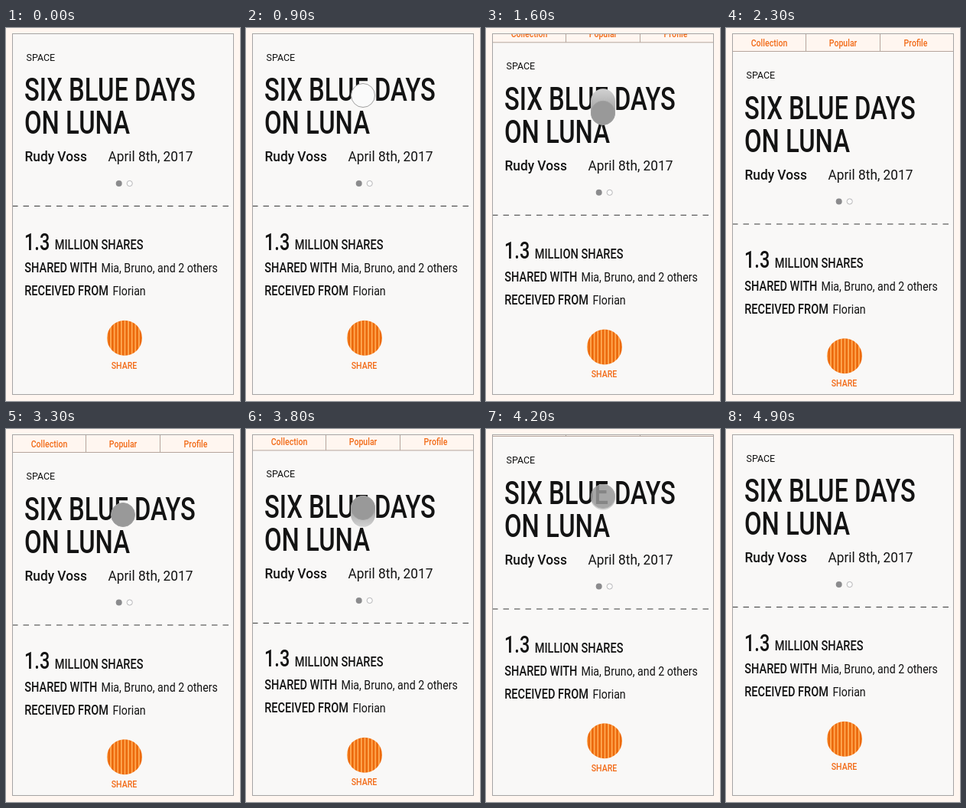
An HTML page that plays this animation: 306x487 px, repeating every 5000 ms.

```html
<!DOCTYPE html>
<html lang="en">
<head>
<meta charset="utf-8">
<title>Article card</title>
<style>
  html, body { margin: 0; height: 100%; overflow: hidden; background: #fff6f0; }
  svg { display: block; width: 306px; height: 487px; }
  text { font-family: Roboto, Inter, sans-serif; }
</style>
</head>
<body>
<svg viewBox="0 0 306 487">
  <defs>
    <clipPath id="inside"><rect x="8" y="7" width="290" height="471.5"/></clipPath>
    <pattern id="stripes" width="4.6" height="8" patternUnits="userSpaceOnUse">
      <rect width="4.6" height="8" fill="#ffa850"/>
      <rect width="2.7" height="8" fill="#ec690c"/>
    </pattern>
    <linearGradient id="fade" gradientUnits="userSpaceOnUse" x1="0" x2="0">
      <stop stop-color="#a0a0a0"/>
      <stop offset="1" stop-color="#d2d2d2"/>
    </linearGradient>
  </defs>
  <rect x="8" y="7" width="290" height="471.5" fill="#f9f8f7"/>
  <g clip-path="url(#inside)">
    <g id="sheet">
      <path d="M8 232.5H298" stroke="#222" stroke-width=".9" stroke-dasharray="7.5 7"/>
      <circle cx="147.7" cy="203" r="4" fill="#8b8b8d"/>
      <circle cx="161.7" cy="203" r="3.6" fill="#fdfdfd" stroke="#a5a5a7" stroke-width=".8"/>
      <circle cx="155" cy="404.7" r="23" fill="url(#stripes)"/>
      <path d="M8.5 -16.5H297.5V7H8.5ZM104.5 -16.5V7M201.5 -16.5V7" fill="#fff6f0" stroke="#b5a59c"/>
    </g>
  </g>
  <rect x="8.5" y="7.5" width="289" height="471" fill="none" stroke="#a5a4a4"/>
  <g id="touch">
    <path id="trail" stroke="url(#fade)" stroke-width="32" stroke-linecap="round"/>
    <circle id="finger" cx="153" r="15.5" stroke="#a0a0a0"/>
  </g>
</svg>
<script>
const LOOP = 5000, PULL = 23.5, TOP = 88, BOTTOM = 112, LAG = 220;
const INK = '#131313', ORANGE = '#f26a16';
const CONDENSED = .77, BOOK = .91;
const [sheet, touch, trail, finger, fade] =
  ['sheet', 'touch', 'trail', 'finger', 'fade'].map(id => document.getElementById(id));

function set(node, attrs) {
  for (const name in attrs) node.setAttribute(name, attrs[name]);
}

function label(words, x, y, size, weight, face, color = INK, anchor = 'start') {
  const node = document.createElementNS('http://www.w3.org/2000/svg', 'text');
  set(node, {
    transform: `translate(${x} ${y}) scale(${face} 1)`,
    'font-size': size, 'font-weight': weight, fill: color, 'text-anchor': anchor
  });
  node.textContent = words;
  sheet.append(node);
}

const small = (words, x, y) =>
  label(words, x, y, 13.7, 500, CONDENSED, ORANGE, 'middle');

label('SPACE', 26.5, 42.5, 13.7, 400, BOOK);
label('SIX BLUE DAYS', 24, 95, 42.5, 500, CONDENSED);
label('ON LUNA', 24, 138, 42.5, 500, CONDENSED);
label('Rudy Voss', 24.5, 174, 19, 500, BOOK);
label('April 8th, 2017', 133.5, 174, 19, 400, BOOK);
label('1.3', 24, 289.5, 30.5, 500, CONDENSED);
label('MILLION SHARES', 63.7, 289.2, 18.9, 500, CONDENSED);
label('SHARED WITH', 24.2, 319.2, 18.9, 500, CONDENSED);
label('Mia, Bruno, and 2 others', 124.5, 319.2, 15.6, 400, BOOK);
label('RECEIVED FROM', 24.2, 349.2, 18.9, 500, CONDENSED);
label('Florian', 139.5, 349.2, 15.6, 400, BOOK);
small('SHARE', 154.5, 444.5);
small('Collection', 56.5, 0);
small('Popular', 153, 0);
small('Profile', 248, 0);

const ramp = (t, from, to) => Math.min(1, Math.max(0, (t - from) / (to - from)));
const ease = p => p < .5 ? 4 * p ** 3 : 1 - 4 * (1 - p) ** 3;
const glide = (t, from, to) => ease(ramp(t, from, to));

// Finger height: dragged down, later dragged back up.
const fingerY = t =>
  TOP + (BOTTOM - TOP) * (glide(t, 1110, 1750) - glide(t, 3510, 4150));

function draw(t) {
  const pull = PULL * (glide(t, 1100, 2100) - glide(t, 3500, 4500));
  set(sheet, { transform: `translate(0 ${pull})` });

  const shown = ramp(t, 780, 880) - ramp(t, 1800, 2150)
              + ramp(t, 2620, 2720) - ramp(t, 4150, 4500);
  const pressed = t < 2400 ? ramp(t, 900, 1150) : ramp(t, 2700, 2920);
  const shade = Math.round(250 - 97 * pressed);
  const head = fingerY(t), tail = fingerY(t - LAG);

  set(touch, { opacity: shown });
  set(finger, { cy: head, fill: `rgb(${shade},${shade},${shade})` });
  set(fade, { y1: head, y2: tail + 16 * Math.sign(tail - head) });
  set(trail, {
    d: `M153 ${tail}V${head}`,
    visibility: Math.abs(head - tail) > .2 ? 'visible' : 'hidden'
  });
}

function tick() {
  draw(performance.now() % LOOP);
  requestAnimationFrame(tick);
}
tick();
</script>
</body>
</html>
```
